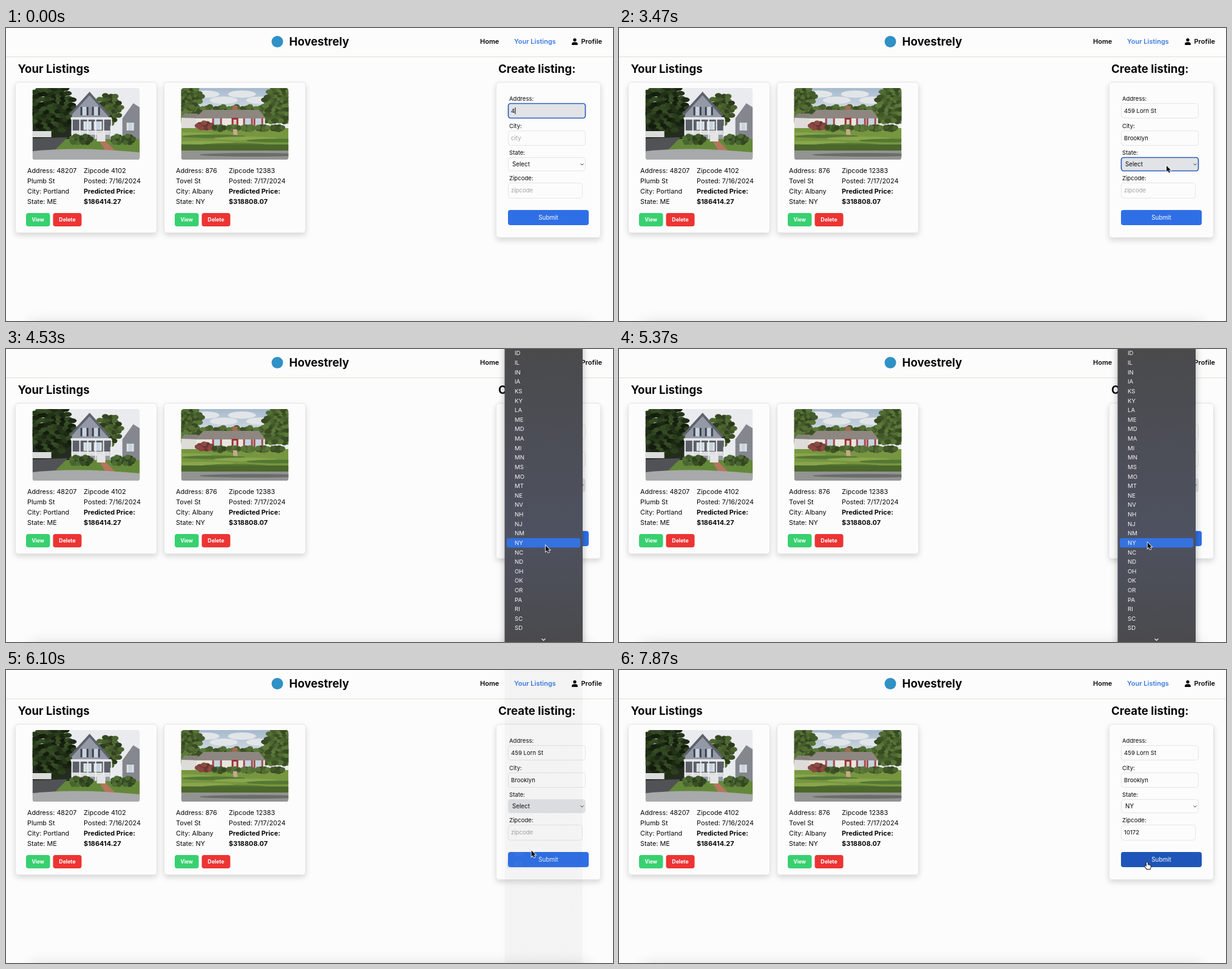
An HTML page with a canvas that plays this animation: 1000 by 483 pixels, repeating every 8000 ms.

```html
<!DOCTYPE html>
<html lang="en">
<head>
<meta charset="utf-8">
<title>Listings</title>
<style>
html, body { margin: 0; width: 100%; height: 100%; overflow: hidden; background: #fcfcfc; }
canvas { display: block; width: 1000px; height: 483px; }
</style>
</head>
<body>
<canvas id="stage"></canvas>
<script>
const LOOP = 8000, W = 1000, H = 483;
const canvas = document.getElementById('stage');
const ctx = canvas.getContext('2d');
const ratio = window.devicePixelRatio || 1;
canvas.width = W * ratio;
canvas.height = H * ratio;

const PAGE = '#fcfcfc', LINE = '#e4e5e6', INK = '#08080a', BLUE = '#2f6fe6';
const ROW = 15.62, MENU_OPEN = 3800, MENU_PICK = 5855, MENU_GONE = 6110;
const STATES = ('Select AL AK AZ AR CA CO CT DE FL GA HI ID IL IN IA KS KY LA ME MD MA MI MN MS MO ' +
  'MT NE NV NH NJ NM NY NC ND OH OK OR PA RI SC SD TN TX UT VT VA WA WV WI WY').split(' ');
const PICK = STATES.indexOf('NY');

// on/off: focus, from/to: first and last key press
const fields = [
  { label: 'Address:', y: 124, w: 128, h: 25, on: -999, off: 1430, value: '459 Lorn St', from: 0, to: 1070 },
  { label: 'City:', y: 169, w: 128, h: 25, on: 1430, off: 2970, value: 'Brooklyn', from: 1770, to: 2430 },
  { label: 'State:', y: 213, w: 128, h: 23, on: 2970, off: 6700 },
  { label: 'Zipcode:', y: 255, w: 123, h: 26, on: 6700, off: 7770, value: '10172', from: 6870, to: 7170 }
];

const moves = [
  { from: 2970, to: 3430, x: 902, y: 227 },
  { from: 3800, to: 4530, x: 889, y: 324 },
  { from: 4630, to: 5750, x: 864, y: 317 },
  { from: 5800, to: 6500, x: 868, y: 268 },
  { from: 7370, to: 7760, x: 870, y: 317 }
];

const ramp = (t, from, to) => Math.max(0, Math.min(1, (t - from) / (to - from)));
const smooth = k => k * k * (3 - 2 * k);

function text(str, x, mid, size, weight = 400, color = INK, align = 'left') {
  ctx.font = `${weight} ${size}px Inter, sans-serif`;
  ctx.textAlign = align;
  ctx.fillStyle = color;
  ctx.fillText(str, x, mid + size * 0.36);
}

function box(x, y, w, h, r, fill, line, width = 1) {
  ctx.beginPath();
  ctx.roundRect(x, y, w, h, r);
  if (fill) { ctx.fillStyle = fill; ctx.fill(); }
  if (line) { ctx.strokeStyle = line; ctx.lineWidth = width; ctx.stroke(); }
}

function rect(color, x, y, w, h) {
  ctx.fillStyle = color;
  ctx.fillRect(x, y, w, h);
}

function shape(path, fill, line, width = 1) {
  const p = new Path2D(path);
  if (line) { ctx.strokeStyle = line; ctx.lineWidth = width; ctx.stroke(p); }
  if (fill) { ctx.fillStyle = fill; ctx.fill(p); }
}

function blob(color, x, y, rx, ry = rx) {
  ctx.beginPath();
  ctx.ellipse(x, y, rx, ry, 0, 0, 7);
  ctx.fillStyle = color;
  ctx.fill();
}

function shadowed(color, blur, dy, draw) {
  ctx.save();
  ctx.shadowColor = color;
  ctx.shadowBlur = blur * ratio;
  ctx.shadowOffsetY = dy * ratio;
  draw();
  ctx.restore();
}

// seeded leaves filling an oval
function leaves(hue, light, x, y, rx, ry, n = 36) {
  for (let i = 0; i < n; i++) {
    const a = i * 2.4, d = Math.sqrt((i + .5) / n);
    const shade = light + 7 * Math.sin(i * 12.99 + x);
    blob(`hsl(${hue} 36% ${shade}%)`, x + rx * d * Math.cos(a), y + ry * d * Math.sin(a), 4 + rx * .08, 4);
  }
}

function sky() {
  const g = ctx.createLinearGradient(0, 0, 0, 55);
  g.addColorStop(0, '#a5b9cd');
  g.addColorStop(1, '#e9ebec');
  rect(g, 0, 0, 177, 118);
}

function photo(x, draw) {
  ctx.save();
  ctx.translate(x, 99);
  ctx.beginPath();
  ctx.roundRect(0, 0, 176.5, 118, 4);
  ctx.clip();
  draw();
  ctx.restore();
}

function pane(x, y, w, h, trim) {
  rect(trim, x - 3, y, w + 6, h);
  rect('#c6d3df', x, y, w, h);
}

function grayHouse() {
  rect('#e9ebee', 0, 0, 177, 118);
  rect('#242c20', 0, 30, 66, 54);
  leaves(95, 15, 32, 34, 38, 42, 90);
  leaves(88, 23, 126, 34, 20, 26);
  shape('M148 50L166 25L177 32V84H148Z', '#85878e');
  pane(158, 57, 6, 13, '#e0e1e3');
  shape('M65 40L94 8L125 42L128 86H65Z', '#949aa5');
  shape('M62 44L94 9L127 46', null, '#5f626c', 4);
  for (const x of [82, 101]) pane(x, 31, 7, 14, '#3d3e4c');
  rect('#5b606a', 66, 52, 62, 24);
  for (const x of [87, 104]) pane(x, 55, 7, 14, '#e0e5e8');
  rect('#e4e5e7', 63, 48, 67, 4);
  rect('#dcdddd', 64, 70, 64, 7);
  for (let x = 64; x < 130; x += 13) rect('#eeeeee', x, 50, 2, 34);
  rect('#64883a', 0, 84, 177, 34);
  rect('#dadcdb', 0, 71, 31, 10);
  shape('M0 83L58 81L38 101L0 107Z', '#515256');
  for (const x of [72, 88, 140, 158]) leaves(92, 25, x, 85, 9, 6, 16);
  rect('#e5e5e5', 106, 74, 14, 14);
  shape('M111 88H121L138 105H121Z', '#b4765f');
  shape('M0 104Q75 96 177 106V118H0Z', '#a8a9aa');
}

function ranchHouse() {
  sky();
  for (let i = 0; i < 4; i++) blob('#e2e5e8', 40 + i * 30, 10 + i % 2 * 10, 23, 6);
  for (let x = 0; x < 177; x += 22) leaves(88, 29, x, 43, 16, 14, 28);
  leaves(88, 27, 14, 15, 20, 17);
  leaves(88, 28, 162, 26, 26, 30, 64);
  rect('#dedcd8', 0, 48, 30, 18);
  shape('M0 49L5 42H26L32 50Z', '#85827d');
  rect('#e9e6df', 25, 49, 113, 18);
  rect('#a36a55', 84, 29, 9, 9);
  shape('M22 50L37 36H128L139 50Z', '#8e8680');
  for (const x of [54, 105, 122]) pane(x, 50, 10, 12, '#a04a4c');
  rect('#9d3336', 83, 49, 11, 19);
  rect('#d8d2ca', 86, 52, 5, 10);
  rect('#779640', 0, 66, 177, 52);
  leaves(5, 34, 39, 62, 12, 5, 18);
  for (let x = 62; x < 177; x += 24) leaves(88, 28, x, 66, 9, 3, 14);
  shape('M85 68H92L93 80H86Z', '#c8a78c');
  for (let i = 0; i < 7; i++) blob(i % 2 ? '#547834' : '#89a64c', i * 53 % 177, 76 + i * 3.5, 52, 3);
  rect('#4c672c', 0, 93, 177, 10);
  rect('#929492', 0, 103, 177, 15);
  blob('#6b6d6c', 120, 110, 90, 3);
}

function card(x, y, w, h) {
  shadowed('rgba(0,0,0,.15)', 10, 4, () => box(x, y, w, h, 5, PAGE));
  box(x + .5, y + .5, w - 1, h - 1, 5, null, LINE);
}

function button(label, x, y, w, h, size, weight, color) {
  box(x, y, w, h, 4, color);
  text(label, x + w / 2, y + h / 2, size, weight, '#fff', 'center');
}

function listing(x, column, left, right, draw) {
  card(x, 89, 234, 249);
  photo(x + 28.7, draw);
  left.forEach((s, i) => text(s, x + 20, 235.5 + i * 17, 10.8));
  right.forEach((s, i) => text(s, column, 235.5 + i * 17, 10.9, i > 1 ? 700 : 400));
  button('View', x + 18, 305, 39.5, 22, 8.3, 700, '#38d070');
  button('Delete', x + 62.5, 305, 47, 22, 8.7, 700, '#ec3434');
}

function header() {
  rect('#dfe1d6', 0, 47, W, 1);
  blob('#2f91c6', 447, 22.5, 9.5);
  text('Hovestrely', 466.5, 22.5, 18.6, 700);
  text('Home', 781, 22.5, 11, 600);
  text('Your Listings', 837, 22.5, 11, 600, '#3b7be2');
  blob(INK, 937, 19.6, 2.7);
  box(932, 23.2, 10, 4.8, [4, 4, 1, 1], INK);
  text('Profile', 947.5, 22.5, 11, 600);
  text('Your Listings', 19.5, 67.5, 18.6, 700);
  text('Create listing:', 811, 67.5, 18.7, 700);
}

function typedText(f, t) {
  if (t < f.from) return '';
  const steps = f.value.length - 1;
  return f.value.slice(0, 1 + Math.floor(steps * ramp(t, f.from, f.to)));
}

function field(f, t) {
  const shade = ramp(t, f.on, f.on + 90) - ramp(t, f.off, f.off + 90);
  const mid = f.y + f.h / 2;
  const menuActive = t >= MENU_OPEN && t < 6230;
  const focused = t >= f.on && t < f.off && !menuActive;
  text(f.label, 829, f.y - 7.5, 9.6);
  box(827.5, f.y + .5, f.w - 1, f.h - 1, 4, `rgba(226,227,230,${shade})`, LINE);
  if (focused) box(827.5, f.y + .5, f.w - 1, f.h - 1, 4, null, '#2c5fbe', 1.7);
  if (!f.value) {
    text(t < 6230 ? 'Select' : 'NY', 834, mid + .3, 9.8);
    shape(`M946.5 ${mid - 1}l2.5 2.6l2.5 -2.6`, null, '#3c3c40');
    return;
  }
  const typed = typedText(f, t);
  const hint = f.label.toLowerCase().replace(':', '');
  text(typed || hint, 832, mid - .2, 9.6, 400, typed ? INK : '#a0a1a6');
  if (focused) rect(INK, 832.3 + ctx.measureText(typed).width, mid - 5.5, 1, 11);
}

function form(t) {
  card(807, 89, 173, 257);
  fields.forEach(f => field(f, t));
  button('Submit', 827, 300, 133, 25, 9.9, 400, t < 7640 ? BLUE : '#1f55b8');
}

function menu(t, tipY) {
  const alpha = 1 - ramp(t, MENU_PICK, MENU_GONE);
  if (t < MENU_OPEN || !alpha) return;
  const first = 225 - 405.4 * smooth(ramp(t, 3850, 4470));
  const top = Math.max(-10, first - 12);
  const hover = t < MENU_PICK ? Math.round((tipY - first) / ROW) : PICK;
  const g = ctx.createLinearGradient(0, 0, 0, H);
  g.addColorStop(0, '#4a4a4c');
  g.addColorStop(.63, '#4e5260');
  g.addColorStop(1, '#4a4a4d');
  ctx.save();
  ctx.globalAlpha = alpha;
  shadowed('rgba(0,0,0,.3)', 12, 3, () => box(821.5, top, 128.5, H + 20 - top, 5, g));
  // rows fade later than the panel
  ctx.globalAlpha = 1 - (1 - alpha) ** 3;
  STATES.forEach((name, i) => {
    const y = first + i * ROW;
    if (y < -10 || y > 468) return;
    if (i === hover) box(825, y - ROW / 2, 121, ROW, 3, '#3472e0');
    text(name, 838, y, 9.6, 400, '#f6f6f8');
  });
  shape('M882.5 477.5l3 3l3 -3', null, '#f0f0f2', 1.2);
  ctx.restore();
}

function tip(t) {
  let x = 893, y = 140;
  for (const m of moves) {
    const k = smooth(ramp(t, m.from, m.to));
    x += (m.x - x) * k;
    y += (m.y - y) * k;
  }
  return [x, y];
}

function pointer(t, x, y) {
  const typing = t < moves[0].from || (t >= 6870 && t < 7370);
  if (typing) return;
  const open = t >= MENU_OPEN && t < MENU_GONE;
  const overText = fields.some(f => f.value && y > f.y && y < f.y + f.h);
  ctx.save();
  ctx.translate(x, y);
  if (!open && overText) {
    shape('M-2 -5L0 -4L2 -5M0 -4V5M-2 6L0 5L2 6', null, '#222');
  } else if (!open && y > 300) {
    shape('M-1 .5Q0-.8 1 .5V4L5 5Q6.2 5.4 6 7L5 11H-.5L-3.6 7Q-4 5.6-2.6 5.8L-1 7Z', '#fff', '#161616', 1.8);
  } else {
    shape('M0 0V10L2.3 7.9L4 11.7L5.8 10.9L4.2 7.2H7.2Z', '#101010', '#fff', 1.6);
  }
  ctx.restore();
}

function render(t) {
  ctx.setTransform(ratio, 0, 0, ratio, 0, 0);
  rect(PAGE, 0, 0, W, H);
  shadowed('rgba(0,0,0,.16)', 24, 0, () => rect(PAGE, 40, 487, 920, 30));
  header();
  listing(15, 128, ['Address: 48207', 'Plumb St', 'City: Portland', 'State: ME'],
    ['Zipcode 4102', 'Posted: 7/16/2024', 'Predicted Price:', '$186414.27'], grayHouse);
  listing(260, 367, ['Address: 876', 'Tovel St', 'City: Albany', 'State: NY'],
    ['Zipcode 12383', 'Posted: 7/17/2024', 'Predicted Price:', '$318808.07'], ranchHouse);
  form(t);
  const [x, y] = tip(t);
  menu(t, y);
  pointer(t, x, y);
}

const start = performance.now();
function tick() {
  render((performance.now() - start) % LOOP);
  requestAnimationFrame(tick);
}
tick();
</script>
</body>
</html>
```
